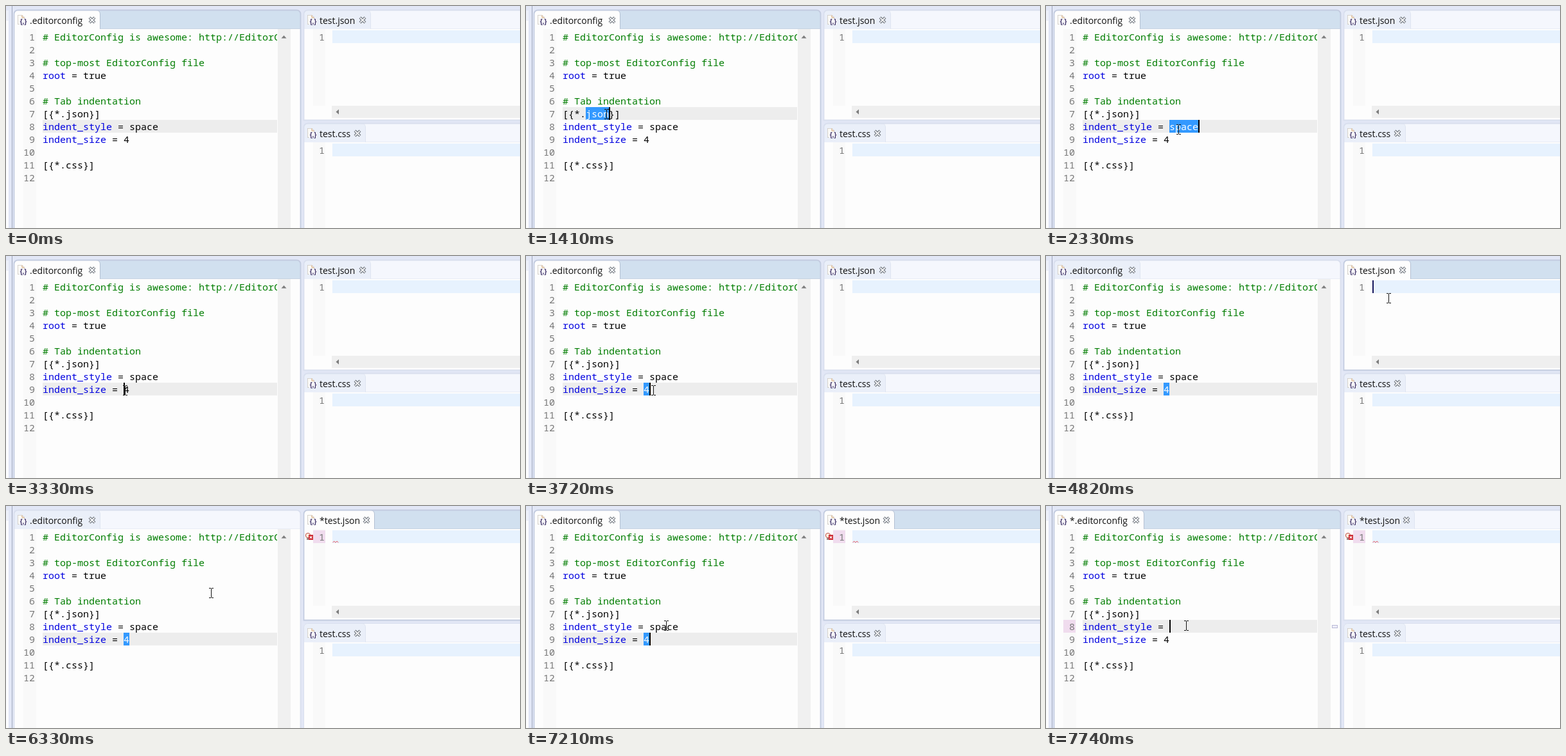
Animation of 800 by 347 pixels, one loop 8000 ms. Source, as an HTML page with a canvas:

```html
<!DOCTYPE html>
<html lang="en">
<head>
<meta charset="utf-8">
<title>Editor settings</title>
<style>
html, body { margin: 0; width: 100%; height: 100%; overflow: hidden; }
canvas { display: block; }
</style>
</head>
<body>
<canvas id="stage" width="800" height="347"></canvas>
<script>
const ctx = document.getElementById('stage').getContext('2d');
const LOOP = 8000, CHAR = 9, LINE = 20, BLINK = 530;
const CODE = '15px "Noto Sans Mono", monospace';
const LABEL = '14px "Open Sans", sans-serif';
const LEFT_X = 57, RIGHT_X = 508, TOP = 38;

// Focus goes right, comes back left; the right pane repaints a little later
const FOCUS_RIGHT = 4740, FOCUS_LEFT = 7210, RIGHT_FADES = 7310;
const JSON_EDIT = 5500, JSON_ERROR = 5730, CONFIG_EDIT = 7740;

const LINES = [
  '# EditorConfig is awesome: http://EditorConfig.org', '',
  '# top-most EditorConfig file', 'root = true', '',
  '# Tab indentation', '[{*.json}]', 'indent_style = space',
  'indent_size = 4', '', '[{*.css}]', ''
];

// Pointer moves: start, end, number of steps, target x, target y
const MOVES = [
  [180, 180, 1, 353, 337], [260, 260, 1, 173, 255],
  [480, 790, 5, 105, 171], [1410, 1410, 1, 125, 169],
  [1480, 2020, 8, 206, 193], [2720, 2950, 4, 185, 210],
  [3560, 3720, 3, 198, 210], [4170, 4740, 8, 533, 66],
  [6250, 6410, 3, 292, 145], [6580, 7210, 9, 218, 187]
];

// Selections: time, line, first column, caret column
const SELECTIONS = [
  [0, 8, -9, -9], [1020, 7, 5, 5], [1170, 7, 4, 8], [2100, 8, 17, 17],
  [2330, 8, 15, 20], [3330, 9, 14, 14], [3640, 9, 14, 15],
  [FOCUS_LEFT, 9, 14, 15], [7310, 8, 18, 18], [7360, 8, 15, 20],
  [CONFIG_EDIT, 8, 15, 15]
];

function rect(x, y, w, h, color) {
  ctx.fillStyle = color;
  ctx.fillRect(x, y, w, h);
}

function text(str, x, y, color, font = CODE, align = 'left') {
  ctx.font = font;
  ctx.textAlign = align;
  ctx.fillStyle = color;
  ctx.fillText(str, x, y);
}

function line(points, color, width = 1) {
  ctx.beginPath();
  points.forEach(([x, y], i) => i ? ctx.lineTo(x, y) : ctx.moveTo(x, y));
  ctx.strokeStyle = color;
  ctx.lineWidth = width;
  ctx.stroke();
}

function cross(x, y, r, color, width) {
  line([[x - r, y - r], [x + r, y + r]], color, width);
  line([[x + r, y - r], [x - r, y + r]], color, width);
}

function fileIcon(x, y) {
  const page = [[.5, .5], [7, .5], [10.5, 4], [10.5, 14.5], [.5, 14.5], [.5, .5]]
    .map(([dx, dy]) => [x + dx, y + dy]);
  line(page, '#b3afa8');
  ctx.fillStyle = '#fbfaf6';
  ctx.fill();
  line([[x + 7, y + .5], [x + 7, y + 4], [x + 10.5, y + 4]], '#d0a070');
  rect(x + 3, y + 6, 12, 9, '#f6f4f8');
  text('{,}', x + 9, y + 13.5, '#41366b', 'bold 10px "Liberation Sans", sans-serif', 'center');
}

function pane(x, y, w, h, title, tabWidth, active, dirty) {
  const tabEnd = x + tabWidth + (dirty ? 6 : 0);
  const outline = () => {
    ctx.beginPath();
    ctx.roundRect(x + .5, y + .5, w, h, [6, 6, 0, 0]);
  };
  outline();
  ctx.fillStyle = '#fdfdfd';
  ctx.fill();
  ctx.save();
  ctx.clip();
  rect(x, y, w + 1, 29, active ? '#d1e0ef' : '#f5f7fd');
  rect(x, y + 29, w + 1, 1, active ? '#c6d3e2' : '#e9edf6');
  ctx.beginPath();
  ctx.moveTo(x, y + 30);
  ctx.lineTo(x, y);
  ctx.lineTo(tabEnd - 7, y + .5);
  ctx.quadraticCurveTo(tabEnd - .5, y + .5, tabEnd - .5, y + 7);
  ctx.lineTo(tabEnd - .5, y + 30);
  ctx.fillStyle = active ? '#fdfdfd' : '#eaeff9';
  ctx.fill();
  ctx.strokeStyle = active ? '#b4c0d2' : '#dfe5f1';
  ctx.lineWidth = 1;
  ctx.stroke();
  ctx.restore();
  outline();
  ctx.strokeStyle = active ? '#c3cce0' : '#d9dfee';
  ctx.stroke();
  fileIcon(x + 6, y + 8);
  text((dirty ? '*' : '') + title, x + 25, y + 21.5, '#101010', LABEL);
  cross(tabEnd - 13, y + 16, 4, '#6f747c', 4);
  cross(tabEnd - 13, y + 16, 3.7, '#fafbfd', 1.8);
}

// Small triangle pointing along (dx, dy)
function arrow(x, y, dx, dy) {
  ctx.beginPath();
  ctx.moveTo(x + dx * 2.5, y + dy * 2.5);
  ctx.lineTo(x - dx * 2 + dy * 4, y - dy * 2 + dx * 4);
  ctx.lineTo(x - dx * 2 - dy * 4, y - dy * 2 - dx * 4);
  ctx.fillStyle = '#7c7c7c';
  ctx.fill();
}

function lineNumber(n, right, top, changed) {
  if (changed) rect(right - 18, top, 19, LINE, '#f0dcee');
  text(n, right, top + 16, '#787878', CODE, 'right');
}

function caretShown(t, since) {
  return (t - since) % (2 * BLINK) < BLINK;
}

function drawCode(t) {
  const [since, row, from, caret] = SELECTIONS.findLast(s => s[0] <= t);
  const active = t < FOCUS_RIGHT || t >= FOCUS_LEFT, edited = t >= CONFIG_EDIT;
  rect(27, 36, 20, 311, '#f9f9f9');
  rect(LEFT_X, TOP + (row - 1) * LINE, 365, LINE, '#ededed');
  ctx.save();
  ctx.beginPath();
  ctx.rect(0, 0, 422, 347);
  ctx.clip();
  LINES.forEach((full, i) => {
    const top = TOP + i * LINE, y = top + 16;
    const str = edited && i === 7 ? full.slice(0, 15) : full;
    const key = str.match(/^\w*/)[0];
    lineNumber(i + 1, 45, top, edited && i === 7);
    text(key, LEFT_X, y, '#0000e0');
    text(str.slice(key.length), LEFT_X + key.length * CHAR, y, str[0] === '#' ? '#007d00' : '#000');
    if (i + 1 !== row) return;
    const x = LEFT_X + from * CHAR;
    if (caret > from) {
      rect(x, top, (caret - from) * CHAR, LINE, '#3399ff');
      text(str.slice(from, caret), x, y, '#fff');
    }
    if (active && caretShown(t, since)) rect(LEFT_X + caret * CHAR, top, 2, LINE, '#000');
  });
  ctx.restore();
  rect(423, 36, 20, 311, '#f0f0f0');
  arrow(432.5, 48.5, 0, -1);
  if (edited) {
    rect(445, 186, 9, 5, '#b9b9d6');
    rect(446, 187, 7, 3, '#eeeefa');
  }
}

function drawJson(t) {
  const edited = t >= JSON_EDIT;
  rect(478, 36, 19, 120, '#f9f9f9');
  rect(RIGHT_X, TOP, 292, LINE, '#e7f2fe');
  lineNumber(1, 496, TOP, edited);
  rect(507, 156, 293, 19, '#efefef');
  arrow(516, 165.5, -1, 0);
  if (t >= JSON_ERROR) {
    ctx.beginPath();
    ctx.arc(470, 46, 3.7, 0, 7);
    ctx.fillStyle = '#fbeedc';
    ctx.fill();
    ctx.strokeStyle = '#c0504a';
    ctx.lineWidth = 1;
    ctx.stroke();
    rect(468, 50, 4, 3, '#9a8c86');
    rect(471, 45, 7, 8, '#cf2d35');
    cross(474.5, 49, 1.7, '#fff', 1.2);
    line([0, 1, 2, 3, 4].map(i => [508.5 + i * 2.2, i % 2 ? 55 : 57.2]), '#e8505a');
  }
  const focused = t >= FOCUS_RIGHT && t < FOCUS_LEFT;
  if (focused && caretShown(t, edited ? JSON_EDIT : FOCUS_RIGHT)) {
    rect(RIGHT_X + (edited ? 4 * CHAR : 0), TOP, 2, LINE, '#15155c');
  }
}

function drawPointer(t) {
  if (t < MOVES[0][0]) return;
  let x = 0, y = 0;
  for (const [start, end, steps, toX, toY] of MOVES) {
    if (t < start) break;
    const step = end > start ? Math.floor((t - start) / (end - start) * (steps - 1) + 1e-6) + 1 : steps;
    const p = Math.min(1, step / steps), ease = p * (2 - p);
    x += (toX - x) * ease;
    y += (toY - y) * ease;
  }
  x = Math.round(x);
  y = Math.round(y);
  rect(x, y - 7, 1, 14, '#111');
  for (const end of [y - 8, y + 7]) {
    rect(x - 3, end, 3, 1, '#111');
    rect(x + 1, end, 3, 1, '#111');
  }
}

function draw(t) {
  const leftActive = t < FOCUS_RIGHT || t >= FOCUS_LEFT;
  const rightActive = t >= FOCUS_RIGHT && t < RIGHT_FADES;
  rect(0, 0, 800, 347, '#e2e7f6');
  rect(0, 7, 4, 340, '#fcfcfe');
  rect(0, 7, 4, 16, '#eef1fa');
  rect(9, 0, 1, 347, '#a0a8bd');
  pane(12, 6, 446, 360, '.editorconfig', 135, leftActive, t >= CONFIG_EDIT);
  drawCode(t);
  pane(463, 6, 360, 172, 'test.json', 105, rightActive, t >= JSON_EDIT);
  drawJson(t);
  pane(463, 183, 360, 200, 'test.css', 97, false, false);
  rect(478, 213, 19, 134, '#f9f9f9');
  rect(RIGHT_X, 215, 292, LINE, '#e7f2fe');
  lineNumber(1, 496, 215, false);
  drawPointer(t);
}

function tick() {
  draw(performance.now() % LOOP);
  requestAnimationFrame(tick);
}
tick();
</script>
</body>
</html>
```
